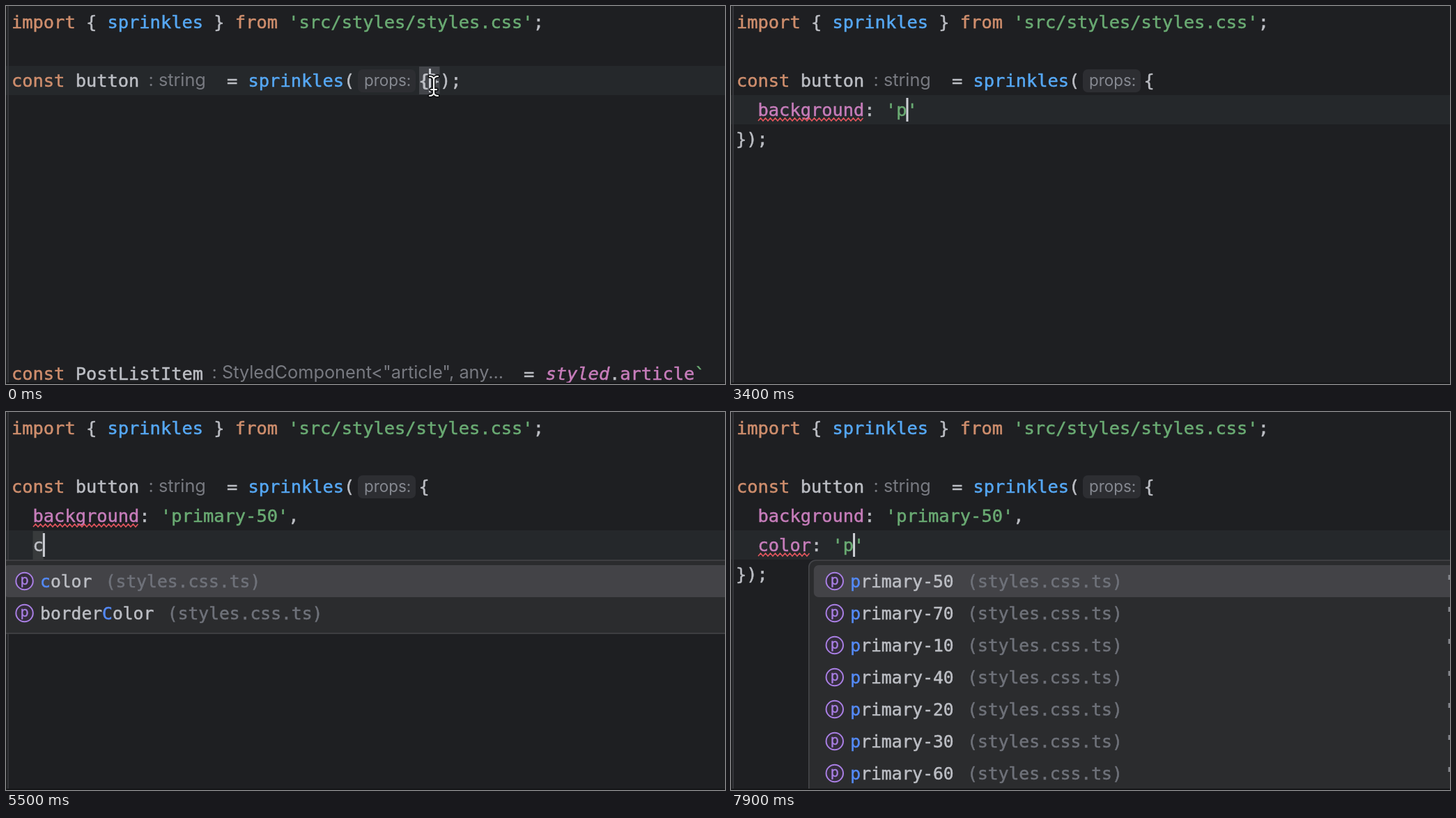
Recreate the animation shown at these times as an HTML page. Size 1032 by 543 pixels, loop 8 s.

```html
<!DOCTYPE html>
<html lang="en">
<head>
<meta charset="utf-8">
<title>Typed style props</title>
<style>
  html, body { margin: 0; width: 100%; height: 100%; overflow: hidden; background: #1e1f22; }
  svg { display: block; width: 1032px; height: 543px; }
  text { white-space: pre; font: 25.38px "DejaVu Sans Mono", monospace; stroke-width: 0.5px; }
  .item { font-size: 24.65px; }
  .bold { font-weight: bold; stroke-width: 0; }
  .italic { font-style: italic; }
  .hint { font: 25.3px Inter, sans-serif; stroke-width: 0; }
  .label { font: 22.4px Inter, sans-serif; stroke-width: 0; }
  .icon { font: 18.5px Inter, sans-serif; text-anchor: middle; }
</style>
</head>
<body>
<svg id="stage" viewBox="0 0 1032 543"></svg>
<script>
const LOOP = 8000, CHAR = 15.28, ITEM_CHAR = 14.84, LEFT = 8, LINE = 42, ROW = 46;
const C = {
  bg: '#1e1f22', row: '#25282b', plain: '#bcbec4', key: '#cf8e6d', fn: '#56a8f5',
  str: '#6aab73', prop: '#c77dbb', hint: '#787a81', mark: '#383b3c', err: '#e2555d',
  popup: '#2b2c2e', edge: '#45464a', sel: '#434347', dim: '#6f727a', match: '#548af7', icon: '#a97fe4'
};

// Each step changes part of the editor state at its time.
const steps = [
  [0, { a: null, b: null, row: 0, col: 0, off: false, mark: null, list: null, sel: 0,
        knownA: false, knownB: false, errA: false, errB: false, gap: false }],
  [100, { a: '', row: 1, col: 2 }],
  [500, { off: true }],
  [1000, { off: false }],
  [1200, { a: 'c', col: 3, mark: [2, 1] }],
  [1400, { list: 'keys' }],
  [1600, { sel: 1 }],
  [1700, { a: 'background: ', col: 14, mark: null, list: null, sel: 0 }],
  [2100, { gap: true }],
  [2400, { a: "background: ''", col: 15 }],
  [2500, { knownA: true }],
  [3000, { gap: false }],
  [3200, { errA: true }],
  [3400, { a: "background: 'p'", col: 16 }],
  [3600, { list: 'values' }],
  [4100, { a: "background: 'primary-50'", col: 25, mark: [15, 10], list: null }],
  [4500, { col: 26, mark: null }],
  [4600, { a: "background: 'primary-50',", col: 27 }],
  [4700, { b: '', row: 2, col: 2 }],
  [5000, { b: 'c', col: 3, mark: [2, 1] }],
  [5400, { list: 'rest' }],
  [5600, { b: 'color: ', col: 9, mark: null, list: null }],
  [5800, { b: 'color: :', col: 10 }],
  [5900, { b: 'color: : ', col: 11 }],
  [6000, { list: 'words' }],
  [6400, { b: 'color: :', col: 10, list: null }],
  [6500, { b: 'color: ', col: 9 }],
  [6600, { knownB: true }],
  [6900, { b: "color: ''", col: 10 }],
  [7400, { b: "color: 'p'", col: 11 }],
  [7500, { errA: false }],
  [7600, { list: 'values', errB: true }]
];

const lists = {
  keys: { typed: 'c', items: ['color', 'background', 'borderColor'] },
  rest: { typed: 'c', items: ['color', 'borderColor'] },
  values: { typed: 'p', marks: true,
            items: [50, 70, 10, 40, 20, 30, 60, 80, 90].map(n => 'primary-' + n) },
  words: { items: ['const', 'const', 'export', 'import', 'type', 'abstract', 'async', 'class'] }
};

const esc = s => s.replace(/&/g, '&amp;').replace(/</g, '&lt;');
const colX = n => LEFT + n * CHAR;
const lineY = n => 86 + n * LINE;
const rect = (x, y, w, h, fill, more = '') =>
  `<rect x="${x}" y="${y}" width="${w}" height="${h}" fill="${fill}" ${more}/>`;
const span = (s, ink) => `<tspan fill="${ink}" stroke="${ink}">${esc(s)}</tspan>`;
const runs = (x, y, list, cls = '') =>
  `<text x="${x}" y="${y}" class="${cls}">${list.map(r => span(...r)).join('')}</text>`;
const text = (x, y, s, ink, cls) => runs(x, y, [[s, ink]], cls);

function squiggle(x1, x2, y) {
  let d = `M${x1} ${y + 4}`;
  for (let x = x1 + 3.5, i = 0; x <= x2; x += 3.5, i++) d += `L${x} ${y + (i % 2 ? 4 : 0)}`;
  return `<path d="${d}" fill="none" stroke="${C.err}" stroke-width="1.5"/>`;
}

function head() {
  return runs(LEFT, 32, [
    ['import', C.key], [' { ', C.plain], ['sprinkles', C.fn], [' } ', C.plain],
    ['from', C.key], [" 'src/styles/styles.css'", C.str], [';', C.plain]
  ]) +
  runs(LEFT, 116, [['const ', C.key], ['button', C.plain]]) +
  text(204.5, 115, ': string', C.hint, 'hint') +
  runs(317, 116, [['= ', C.plain], ['sprinkles', C.fn], ['(', C.plain]]) +
  rect(505, 91, 83, 33, '#2d2e32', 'rx="7"') +
  text(514, 115, 'props:', '#868991', 'label');
}

function closedCall() {
  return rect(593, 87, 29.5, 40, '#43454a') +
    text(592.5, 116, '{}', C.plain, 'bold') + text(623, 116, ');', C.plain) +
    runs(LEFT, 537, [['const ', C.key], ['PostListItem', C.plain]]) +
    text(295.5, 535, ': StyledComponent<"article", any...', C.hint, 'hint') +
    text(743, 537, '=', C.plain) +
    text(774.5, 537, 'styled', C.prop, 'italic') +
    runs(866, 537, [['.', C.plain], ['article', C.prop], ['`', C.str]]) +
    rect(607, 90, 3, 34, '#ced0d6') + pointer(614, 115);
}

function pointer(x, y) {
  const d = `M${x - 6} ${y - 14}q5 0 6 4q1 -4 6 -4M${x} ${y - 10}V${y + 10}` +
            `M${x - 6} ${y + 14}q5 0 6 -4q1 4 6 4M${x - 4} ${y + 5}h8`;
  const line = (c, w) =>
    `<path d="${d}" fill="none" stroke="${c}" stroke-width="${w}" stroke-linecap="round"/>`;
  return line('#101113', 5.5) + line('#f4f4f4', 2.2);
}

function propLine(s, n, known, err) {
  const [, name, mid, str, end] = s.match(/^(\w*)([: ]*)('[^']*')?(.*)$/);
  const y = lineY(n);
  return runs(colX(2), y + 30, [
    [name, known ? C.prop : C.plain], [mid, C.plain], [str || '', C.str], [end, C.plain]
  ]) + (err ? squiggle(39, colX(2 + name.length), y + 33) : '');
}

function itemRuns(s, typed) {
  const i = s.toLowerCase().indexOf(typed);
  return [[s.slice(0, i), C.plain], [s[i], C.match], [s.slice(i + 1), C.plain]];
}

function popup(s) {
  const { typed, items, marks } = lists[s.list];
  const token = colX(s.col - (typed ? 1 : 0));
  const x = token - (typed ? 49 : 13), y = lineY(s.row + 1) + 1;
  let out = rect(x, y, 1200, items.length * ROW + 13, C.popup,
                 `rx="10" stroke="${C.edge}" stroke-width="1.6"`) +
            rect(x + 7, y + 7 + s.sel * ROW, 1150, ROW, C.sel, 'rx="7"');
  items.forEach((item, i) => {
    const mid = y + 30 + i * ROW, base = mid + 9;
    if (typed) {
      const tx = x + 59.5;
      out += `<circle cx="${x + 37}" cy="${mid}" r="12.2" fill="#332d3b" stroke="${C.icon}" stroke-width="2"/>` +
        text(x + 37, mid + 5, 'p', C.icon, 'icon') +
        runs(tx, base, itemRuns(item, typed), 'item') +
        text(tx + item.length * ITEM_CHAR + 19.5, base, '(styles.css.ts)', C.dim, 'item');
      if (marks && x < 150) out += rect(1029.5, mid - 9, 3, 7, '#85878d');
    } else {
      out += text(x + 20, base, item, C.plain, 'item bold');
      if (i === 1) out += text(x + 111.5, base, 'name = (params) => {...}', C.dim, 'item');
    }
  });
  return out;
}

function draw(s) {
  const y = lineY(s.row);
  let out = rect(0, 0, 1032, 543, C.bg) + rect(0, y, 1032, LINE, C.row) +
            rect(2, 0, 2, 543, '#35363a');
  if (s.mark) out += rect(colX(s.mark[0]), y + 1, s.mark[1] * CHAR, LINE - 1, C.mark);
  out += head();
  if (s.a === null) {
    out += closedCall();
  } else {
    out += text(592.5, 116, '{', C.plain) + propLine(s.a, 1, s.knownA, s.errA);
    if (s.b !== null) out += propLine(s.b, 2, s.knownB, s.errB);
    out += text(LEFT - 1, lineY(s.b === null ? 2 : 3) + 30, '});', C.plain);
    if (s.gap) out += squiggle(206, 223, 161);
    if (!s.off) out += rect(colX(s.col) - 1, y + 4, 3, 34, '#ced0d6');
    if (s.list) out += popup(s);
  }
  return out + rect(0, 541, 1032, 2, '#151618');
}

const stage = document.getElementById('stage');
const start = performance.now();
let shown = -1;

function tick() {
  const t = (performance.now() - start) % LOOP;
  const now = steps.filter(([at]) => at <= t);
  if (now.length !== shown) {
    shown = now.length;
    stage.innerHTML = draw(Object.assign({}, ...now.map(([, change]) => change)));
  }
  requestAnimationFrame(tick);
}
tick();
</script>
</body>
</html>
```
